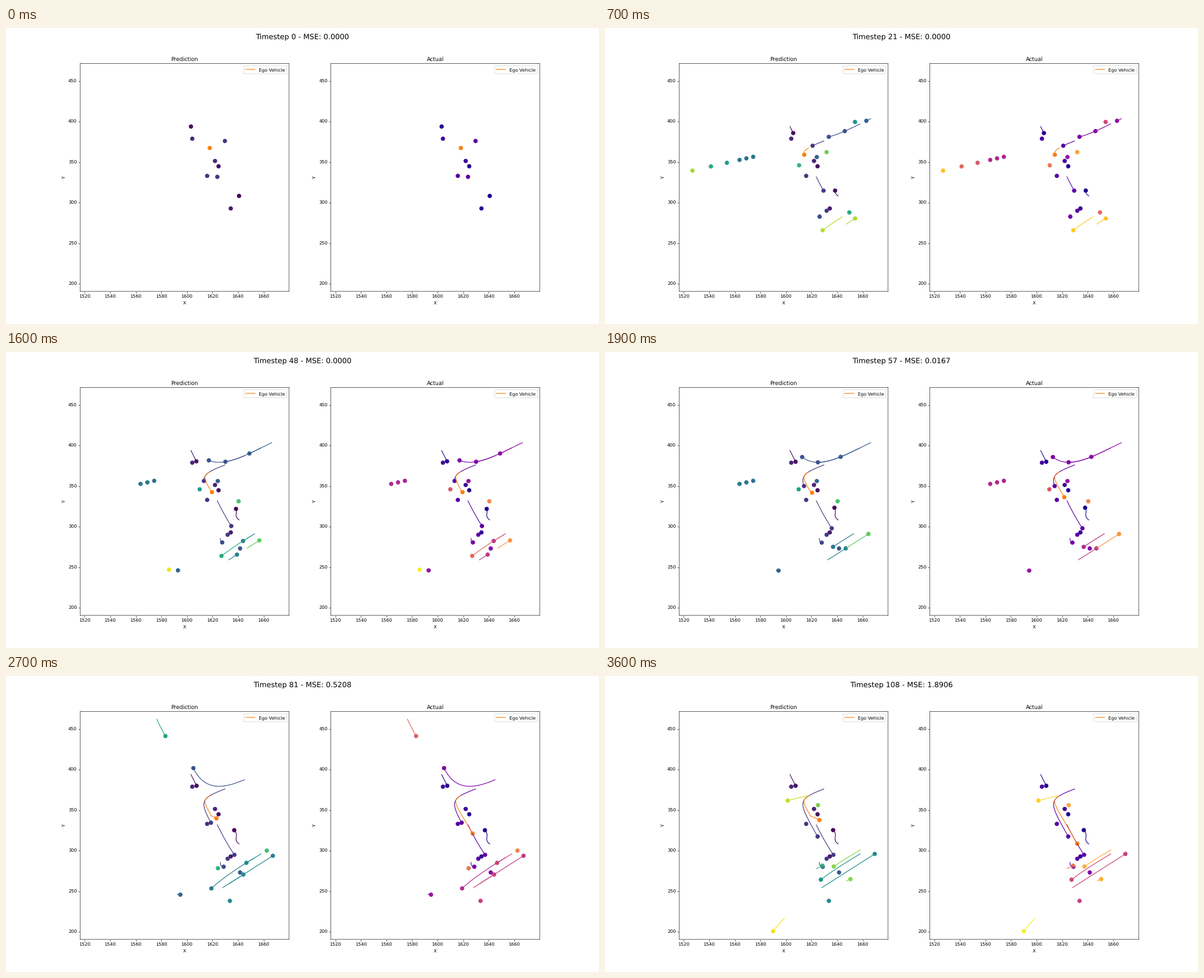
Recreate the animation shown at these times as a matplotlib script. Size 1058x529 px, loop 3.7 s.

```python
import math

import numpy as np
import matplotlib.pyplot as plt
from matplotlib import colormaps
from matplotlib.animation import FuncAnimation

FRAMES, STEP = 37, 3
LAST = FRAMES - 1
XLIM, YLIM = (1516.47, 1679.93), (190.57, 471.68)
EGO = "#ff7f0e"
BRANCH = 16  # frame at which the predicted ego leaves the real path

plt.rcParams.update({"text.hinting": "none", "path.snap": False})
fig, axes = plt.subplots(1, 2, figsize=(18, 9), dpi=1058 / 18)
heading = fig.suptitle("Timestep 0 - MSE: 0.0000", fontsize=16)


def world(x, y):
    """Stage pixels of the left panel to plot units."""
    return XLIM[0] + (x - 132.25) / 2.28, YLIM[1] - (y - 63.88) / 1.449


class Curve:
    """Bezier curve of any degree, addressed by distance along it."""

    def __init__(self, *points):
        u, n = np.linspace(0, 1, 200), len(points) - 1
        basis = [math.comb(n, i) * u ** i * (1 - u) ** (n - i)
                 for i in range(n + 1)]
        self.x, self.y = np.array(points, float).T @ np.array(basis)
        steps = np.hypot(np.diff(self.x), np.diff(self.y))
        self.s = np.append(0, np.cumsum(steps))
        self.length = self.s[-1]

    def at(self, s):
        return np.interp(s, self.s, self.x), np.interp(s, self.s, self.y)


class Track:
    """A vehicle whose place is a function of the frames since its entry."""

    def __init__(self, shade, place, start=0, end=LAST):
        self.shade, self.place = shade, place
        self.start, self.end = start, end

    def visible(self, k):
        return self.start <= k <= self.end

    def trail(self, k):
        t = np.append(np.arange(self.start, k - 0.01, 1 / STEP), k)
        return world(*self.place(t - self.start))


tracks = []


def drive(shade, lane, speed, start=0, end=LAST, skip=0, gain=0, dy=0):
    """Follow a lane, entering it `skip` pixels after its beginning."""
    def place(t):
        x, y = lane.at(skip + speed * t + gain * t * t)
        return x, y + dy
    tracks.append(Track(shade, place, start, end))


def coast(shade, duration, *points, start=0, end=LAST):
    """Slow down to a stop at the end of a curve."""
    path = Curve(*points)

    def place(t):
        left = 1 - np.clip(t / duration, 0, 1)
        return path.at(path.length * (1 - left ** 2))
    tracks.append(Track(shade, place, start, end))


def park(shade, x, y, start=0, end=LAST):
    tracks.append(Track(shade, lambda t: (x + 0 * t, y + 0 * t), start, end))


# upper road, bending away to the north-west
north = Curve((474, 162.5), (412, 192), (352, 232), (326, 143))
drive(.25, north, 4.75, 1, 33, skip=54, gain=-.025)
drive(.26, north, 4.9, .67, 26, skip=21.5, gain=-.03)
drive(.30, north, 2.6, 4, 26, gain=.09)

# lower road, south-west bound
south = Curve((468.5, 310.5), (420, 339), (372, 368), (345, 403))
drive(.89, south, 7.3, 1.2, 7, skip=53)
drive(.61, south, 6.9, 7, 18, skip=38)
drive(.41, south, 6.4, 12.2, 32, skip=29)
drive(.50, south, 5.9, 21.8, skip=15.5)
drive(.70, south, 6.35, 26.4, 34)
drive(.82, south, 8, 29, skip=15, dy=-7)

# lower road, north-east bound
east = Curve((387, 378.5), (490, 312.8))
drive(.87, east, 6.2, 4, 11, skip=51.5)
drive(.75, east, 7.1, 12.4, 20, skip=51.5)
drive(.45, east, 6.9, 13.5, 28, skip=12.5)
drive(.48, east, 7.6, 21.3)

# single drivers
drive(.16, Curve((390.5, 202.3), (340, 222), (345, 225), (379.4, 287.6)), 3.13)
drive(.59, Curve((269, 77.5), (275, 92), (285, 107), (297, 133)), 4.65, 19.7, 33)
drive(.91, Curve((361, 214.5), (320, 224.5)), 6, 30)
drive(.98, Curve((320, 433.5), (309, 444), (300, 456.5)), 5.75, 30.7)
drive(.82, Curve((431, 366.5), (440, 362.5)), .95, 28)
drive(.65, Curve((377, 344.5), (390, 338.5)), 1.2, 26)

# vehicles coming to rest
coast(.05, 20, (330, 176.5), (340, 196.6))
coast(.17, 27, (377, 266.4), (392, 297), (407.5, 320))
coast(.02, 30, (415.8, 300.5), (404, 292), (417, 286), (407, 275.8))
coast(.22, 30, (382.5, 333.5), (382, 341), (388.5, 341.3), start=1)
coast(.32, 8, (305.5, 390.5), (311, 391.2), start=15, end=33)

# parked all along
park(.11, 332.3, 198.2)
park(.10, 372.9, 238)
park(.04, 379.2, 247.5)
park(.15, 358.9, 264.7)
park(.07, 401, 322.9)
park(.17, 395.4, 327, 1)

# the row on the left lies on one straight line
for x, shade, start, end in [(156, .86, 5, 11), (189, .61, 1, 14),
                             (203, .76, 8, 14), (217.5, .56, 1, 14)]:
    park(shade, x, 255.3 - .228 * (x - 156), start, end)
for i in range(3):
    x = 240 + 12.2 * i
    park(.40 - .01 * i, x, 255.3 - .228 * (x - 156), 1, 20)

# parked for a while
park(.51, 446, 168.3, 1, 13)
park(.31, 377.9, 231, 1, 19)
park(.80, 380, 231.3, 28)
park(.66, 346.3, 245.8, 1, 12)
park(.56, 345.5, 245.8, 13, 26)
park(.78, 395.3, 222.3, 3, 8)
park(.27, 417.6, 351.5, 8)
park(.71, 415, 267.2, 13, 25)
park(.95, 418.8, 270.5, 21, 24)
park(.98, 290.8, 389.5, 15, 18)
park(.95, 320.5, 388.8, 21, 24)
park(.47, 399.4, 402.3, 20)

tracks.sort(key=lambda tr: tr.shade)

ego_lane = Curve((363.4, 214.8), (345, 224), (358, 232), (394.5, 299.5))


def ego_actual(t):
    return ego_lane.at(ego_lane.length * t / LAST
                       - 4.5 * np.sin(2 * np.pi * t / LAST))


def ego_predicted(t):
    x, y = ego_actual(np.minimum(t, BRANCH))
    drift = np.maximum(t - BRANCH, 0)
    return x + .75 * drift, y + .32 * drift


rmse = np.polynomial.Polynomial.fit(
    [49, 66, 93, 108], np.sqrt([0, .1065, 1.0899, 1.8906]), 3)


class Panel:
    def __init__(self, ax, title, cmap, ego_path):
        self.ego = Track(0, ego_path)
        self.colors = colormaps[cmap]([tr.shade for tr in tracks])
        self.lines = [ax.plot([], [], color=c)[0] for c in self.colors]
        self.dots = ax.scatter([], [], s=70)
        self.ego_dot = ax.scatter([], [], s=70, color=EGO)
        self.ego_line, = ax.plot([], [], color=EGO, label="Ego Vehicle")
        ax.set(title=title, xlabel="X", ylabel="Y", xlim=XLIM, ylim=YLIM)
        ax.legend(loc="upper right")

    def draw(self, k):
        spots, shades = [], []
        for tr, line, color in zip(tracks, self.lines, self.colors):
            if tr.visible(k):
                x, y = tr.trail(k)
                line.set_data(x, y)
                spots.append((x[-1], y[-1]))
                shades.append(color)
            else:
                line.set_data([], [])
        self.dots.set_offsets(spots)
        self.dots.set_color(shades)
        x, y = self.ego.trail(k)
        self.ego_line.set_data(x, y)
        self.ego_dot.set_offsets([(x[-1], y[-1])])


panels = [Panel(axes[0], "Prediction", "viridis", ego_predicted),
          Panel(axes[1], "Actual", "plasma", ego_actual)]


def draw(k):
    t = k * STEP
    mse = rmse(t) ** 2 if t > 49 else 0
    heading.set_text(f"Timestep {t} - MSE: {mse:.4f}")
    for panel in panels:
        panel.draw(k)
    return []


anim = FuncAnimation(fig, draw, frames=FRAMES, interval=100,
                     init_func=lambda: draw(0), repeat=True)
plt.show()
```
